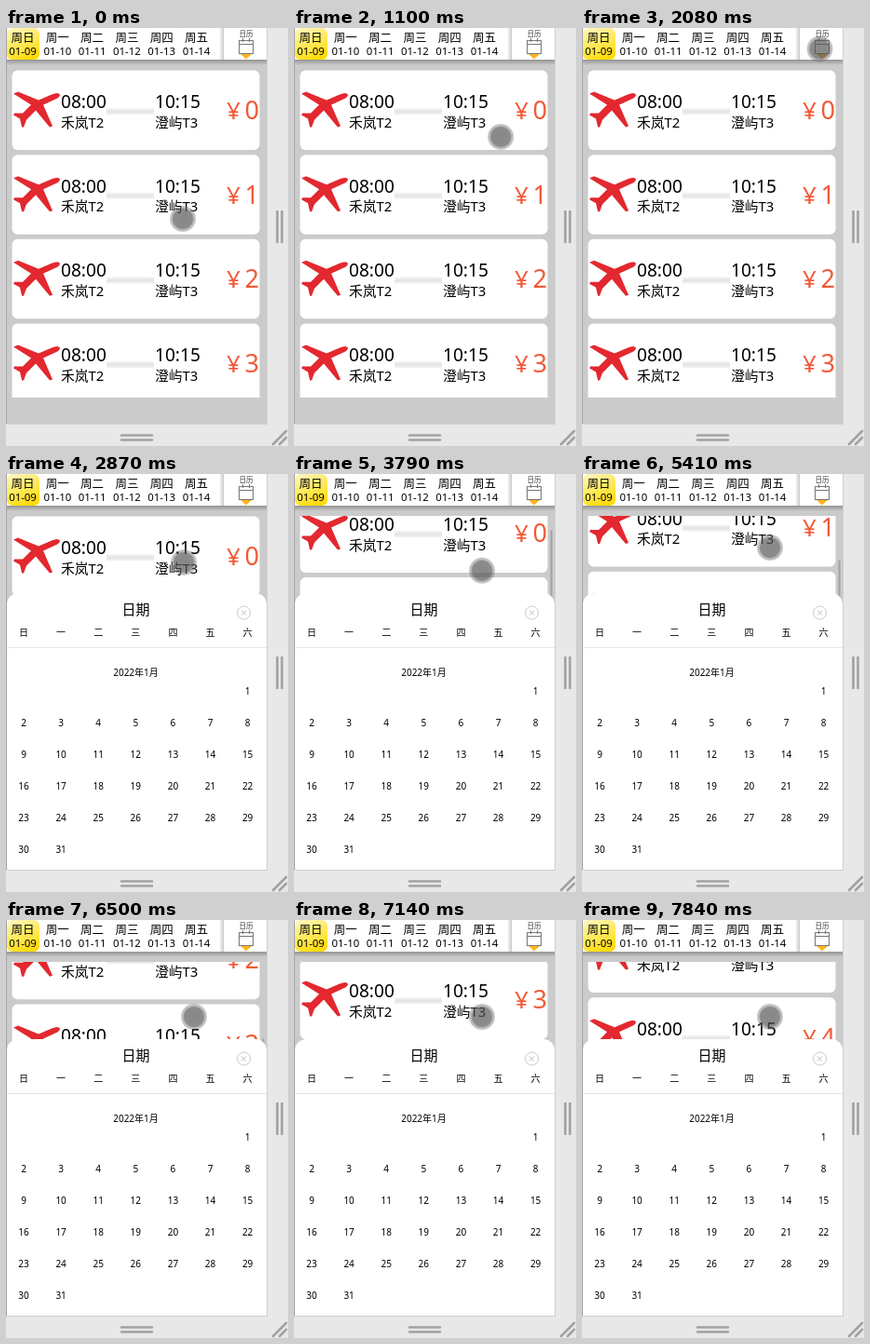
These frames come from a looping animation (303x449 px, 8 s). An HTML page with a canvas:

```html
<!DOCTYPE html>
<html lang="zh">
<head>
<meta charset="utf-8">
<style>
  html, body { margin: 0; width: 100%; height: 100%; overflow: hidden; }
  canvas { display: block; }
</style>
</head>
<body>
<canvas id="stage" width="303" height="449"></canvas>
<script>
const ctx = document.getElementById('stage').getContext('2d');
const FONT = '"Noto Sans", "Noto Sans CJK SC", "Noto Sans CJK", sans-serif';
const DAYS = [...'日一二三四五六'];
const LOOP = 8000;
const REFRESH = 125;
const SWIPE_START = 2808, SWIPE_TIME = 702, SWIPE_REST = 0.34, SWIPE_REACH = 52;
const SHEET_START = 2330, SHEET_TIME = 350, SHEET_HEIGHT = 297;

// Where the list has scrolled to after each swipe.
const SCROLL_STOPS = [0, 25, 45, 78, 170, 227, 275, 325];

// Path of the pointer: time, x, y. Swipes lift it from the last point.
const POINTER_PATH = [[500, 190, 205], [1340, 244, 57], [1830, 255.5, 22.5],
  [2350, 255.5, 22.5], [2800, 183, 104], [3500, 186, 104], [3750, 202, 104]];

const clamp = v => Math.max(0, Math.min(1, v));
const mix = (a, b, p) => a + (b - a) * p;
const smooth = p => p * p * (3 - 2 * p);

function pointerPath(t) {
  const next = POINTER_PATH.findIndex(point => point[0] > t);
  if (next <= 0) return POINTER_PATH.at(next).slice(1);
  const [t1, x1, y1] = POINTER_PATH[next - 1], [t2, x2, y2] = POINTER_PATH[next];
  const p = (t - t1) / (t2 - t1);
  return [mix(x1, x2, p), mix(y1, y2, p)];
}

function swipeAt(t) {
  const cycle = Math.max(0, (t - SWIPE_START) / SWIPE_TIME);
  const count = Math.floor(cycle);
  const drag = clamp((cycle - count - SWIPE_REST) / (1 - SWIPE_REST));
  const from = SCROLL_STOPS[count], to = SCROLL_STOPS[count + 1] ?? from;
  return { lift: drag * SWIPE_REACH, scroll: mix(from, to, drag) };
}

function rect(x, y, w, h, fill) {
  ctx.fillStyle = fill;
  ctx.fillRect(x, y, w, h);
}

function roundRect(x, y, w, h, radius, fill) {
  ctx.beginPath();
  ctx.roundRect(x, y, w, h, radius);
  ctx.fillStyle = fill;
  ctx.fill();
}

function text(str, x, y, size, align = 'center', color = '#000') {
  ctx.font = `${size}px ${FONT}`;
  ctx.textAlign = align;
  ctx.fillStyle = color;
  ctx.fillText(str, x, y);
}

function lines(color, width, ...segments) {
  ctx.strokeStyle = color;
  ctx.lineWidth = width;
  ctx.beginPath();
  for (const [x1, y1, x2, y2] of segments) {
    ctx.moveTo(x1, y1);
    ctx.lineTo(x2, y2);
  }
  ctx.stroke();
}

function gradient(x1, y1, x2, y2, ...colors) {
  const g = ctx.createLinearGradient(x1, y1, x2, y2);
  colors.forEach((c, i) => g.addColorStop(i / (colors.length - 1), c));
  return g;
}

const plane = new Path2D(`M58 26 Q56 23 49 26 L35 32 L13 23 L8 25 L27 37 L18 46
  L9 46 L8 48 L15 52 L17 61 L19 61 L22 53 L32 43 L47 61 L50 60 L40 37 L53 31 Q58 29 58 26 Z`);

function card(index, y) {
  ctx.save();
  ctx.translate(0, y);
  roundRect(6.5, 0, 266, 85.5, 6, '#fff');
  ctx.fillStyle = '#e3282f';
  ctx.fill(plane);
  rect(108, 40.5, 51, 7, gradient(0, 40.5, 0, 47.5, '#f6f6f6', '#e4e4e4', '#f2f2f2'));
  for (const [x, time, place] of [[59, '08:00', '禾岚T2'], [160, '10:15', '澄屿T3']]) {
    text(time, x, 40.5, 19.1, 'left');
    text(place, x, 61.2, 14.8, 'left');
  }
  text('¥', 244.5, 52.5, 26, 'center', '#f05a37');
  text(index, 272, 52.5, 27, 'right', '#f05a37');
  ctx.restore();
}

function list(scroll) {
  ctx.save();
  ctx.beginPath();
  ctx.rect(1, 45, 279, 352);
  ctx.clip();
  for (let i = 0; i < 9; i++) card(i, 45.5 + i * 90.67 - scroll);
  if (scroll) roundRect(275.5, 52 + scroll * 0.33, 2, 117, 1, '#a2a2a2');
  ctx.restore();
}

function header() {
  rect(1, 34, 279, 6, gradient(0, 34, 0, 40, 'rgba(0,0,0,.28)', 'rgba(0,0,0,0)'));
  rect(1, 0, 279, 34, '#fff');
  roundRect(1, 0, 35, 34, 6, gradient(8, 0, 22, 34, '#fff6b8', '#ffe95e', '#ffdb0a'));
  for (let i = 0; i < 6; i++) {
    const x = 18 + i * 37.3;
    text('周' + DAYS[i], x, 15, 12.5);
    text('01-' + String(9 + i).padStart(2, '0'), x, 29, 11.4);
  }
  rect(229, 0, 5, 34, gradient(229, 0, 234, 0, 'rgba(0,0,0,0)', 'rgba(0,0,0,.22)'));
  text('日历', 258, 9, 7.5, 'center', '#333');
  ctx.fillStyle = '#ffb51b';
  ctx.beginPath();
  ctx.moveTo(251, 27);
  ctx.lineTo(265, 27);
  ctx.lineTo(258, 33.5);
  ctx.fill();
  roundRect(250, 12, 16, 16, 2, '#fff');
  ctx.strokeStyle = '#777';
  ctx.lineWidth = 1;
  ctx.strokeRect(250.5, 13.5, 15, 14);
  lines('#777', 1, [250, 17.5, 266, 17.5], [254.5, 11, 254.5, 15], [261.5, 11, 261.5, 15]);
}

function sheet(height) {
  ctx.save();
  ctx.beginPath();
  ctx.rect(1, 0, 279, 425);
  ctx.clip();
  ctx.translate(0, SHEET_HEIGHT - height);
  roundRect(1, 128, 279, 297, [12, 12, 0, 0], '#fff');
  text('日期', 139.5, 150.5, 15);
  ctx.strokeStyle = '#ccc';
  ctx.lineWidth = 1;
  ctx.beginPath();
  ctx.arc(255.5, 149, 7, 0, Math.PI * 2);
  ctx.stroke();
  lines('#bbb', 1, [253, 146.5, 258, 151.5], [258, 146.5, 253, 151.5]);
  const column = i => 19 + i * 40.1;
  DAYS.forEach((day, i) => text(day, column(i), 173.5, 10));
  rect(1, 186, 279, 1, '#e6e6e6');
  text('2022年1月', 139.5, 217, 10);
  for (let day = 1; day <= 31; day++) {
    const cell = day + 5;
    text(day, column(cell % 7), 237 + Math.floor(cell / 7) * 34, 10);
  }
  ctx.restore();
}

function windowFrame() {
  rect(280, 0, 23, 449, '#e8e8e8');
  rect(0, 425, 303, 24, '#e8e8e8');
  lines('#a5a5a5', 1, [0.5, 0, 0.5, 425]);
  lines('#cfcfcf', 1, [280.5, 0, 280.5, 425], [0, 425.5, 281, 425.5]);
  ctx.lineCap = 'round';
  lines('#a2a2a2', 2.6, [291.5, 197, 291.5, 230], [296.5, 197, 296.5, 230],
    [124, 437.5, 157, 437.5], [124, 442.5, 157, 442.5],
    [287, 447, 301, 433], [294, 447, 301, 440]);
  ctx.lineCap = 'butt';
}

function pointer(x, y) {
  const g = ctx.createRadialGradient(x, y, 0, x, y, 14);
  g.addColorStop(0, 'rgba(85,85,85,.7)');
  g.addColorStop(0.74, 'rgba(85,85,85,.68)');
  g.addColorStop(0.84, 'rgba(100,100,100,.45)');
  g.addColorStop(1, 'rgba(110,110,110,.35)');
  ctx.beginPath();
  ctx.arc(x, y, 14, 0, Math.PI * 2);
  ctx.fillStyle = g;
  ctx.fill();
}

function draw(now) {
  const t = Math.floor(now % LOOP / REFRESH) * REFRESH;
  const { lift, scroll } = swipeAt(t);
  const [x, y] = pointerPath(t);
  rect(0, 0, 303, 449, '#cbcbcb');
  list(scroll);
  header();
  sheet(SHEET_HEIGHT * smooth(clamp((t - SHEET_START) / SHEET_TIME)));
  windowFrame();
  pointer(x, y - lift);
  requestAnimationFrame(draw);
}
requestAnimationFrame(draw);
</script>
</body>
</html>
```
